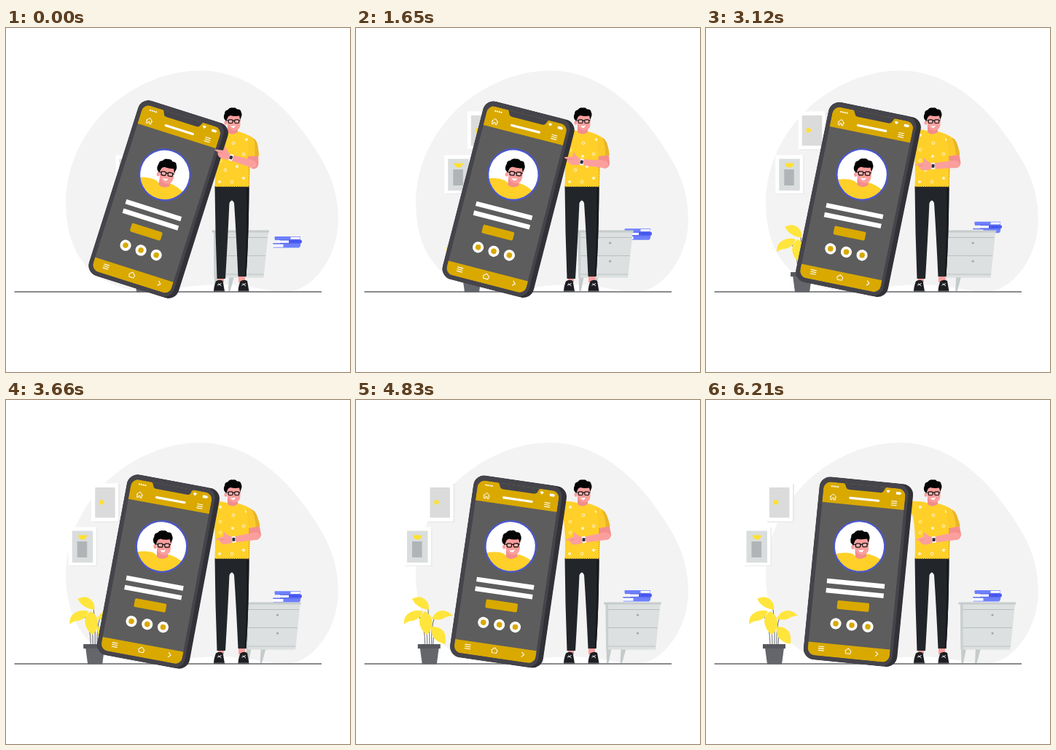
Write an HTML page that moves like this. It is 472 px wide and 472 px high and loops after 6.24 s.

```html
<!DOCTYPE html>
<html lang="en">
<head>
<meta charset="utf-8">
<title>Profile on a phone</title>
<style>
  html, body { margin: 0; width: 100%; height: 100%; overflow: hidden; background: #fff; }
  svg { display: block; width: 100%; height: 100%; }
</style>
</head>
<body>
<svg viewBox="0 0 472 472">
  <defs>
    <clipPath id="screenClip"><rect x="-61.700" y="-119" width="112.700" height="239" rx="10"/></clipPath>
    <clipPath id="avatarClip"><circle r="34"/></clipPath>
    <clipPath id="bodyClip"><rect x="-67.500" y="-126" width="129" height="252" rx="15"/></clipPath>

    <!-- head, centred on its face -->
    <g id="head">
      <path d="M-7 6V15Q-1 20 7 15V6Z" fill="#f28d8b"/>
      <path d="M-8-9H10.500V4Q10 12 3 12.500Q-4 12-7 6Z" fill="#fb9f9d"/>
      <ellipse cx="-9.500" cy="2" rx="2" ry="2.800" fill="#fb9f9d"/>
      <path d="M-11.500-3Q-13-7-11-10.500Q-11-15-7-15.500Q-4-19.500 0-18.500Q4-19.500 6-16.500Q11-17 11.500-13Q13.500-9 11.500-5.500L10.500-2L9-7.500Q2-6.500-3-8Q-7-7-7.500-3L-9-.5Z" fill="#050505"/>
      <g fill="#ffb2ae" stroke="#161214" stroke-width="1.200">
        <rect x="-5.800" y="-2.100" width="5.800" height="4.600" rx="1.200"/>
        <rect x="2.800" y="-2.100" width="5.800" height="4.600" rx="1.200"/>
        <path d="M0-.8H2.800M-9.500-1H-5.800M8.600-1H10.500" fill="none"/>
      </g>
      <path d="M-3 6Q1 7.200 4 5.600Q3 9.200 .5 9Q-2 8.700-3 6Z" fill="#fff"/>
    </g>
    <g id="menu"><path d="M-4-2.700H4M-4 0H4M-4 2.700H4" stroke="#fff" stroke-width="1.100"/></g>
    <path id="home" d="M-4.500.5L0-4L4.500.5M-3.300-.5V4H-1.200V1.500H1.200V4H3.300V-.5" fill="none" stroke="#fff" stroke-width=".9"/>
    <g id="shoe">
      <path d="M-7.500 0Q-7.500-6-4.500-14Q0-17 5-14.500L7.500 0Z" fill="#1d1e22"/>
      <path d="M-7-1H7" stroke="#4b4c52"/>
      <path d="M-2.500-8.500L3-11M-1.500-11L3-7.500" stroke="#fff" stroke-width=".9"/>
    </g>
  </defs>

  <rect width="472" height="472" fill="#fff"/>
  <path d="M82 238C83 190 103 146 140 110C178 76 224 58 268 58.500C330 59 378 102 408 143C436 181 456 214 456 264C455 316 420 361 386 361.500C360 363 340 353 298 352C250 352 220 361 185 361C150 358 118 341 102 316C88 296 82 266 82 238Z" fill="#f3f3f3"/>

  <g id="pictures">
    <path d="M84 115H121V168H84ZM53 175H90V228H53Z" fill="#e9e9e9"/>
    <path d="M82 114.500H119V166.500H82ZM50.500 174.500H88.500V227H50.500Z" fill="#fff"/>
    <rect x="87" y="120" width="27.500" height="41.500" fill="#dbdbdb"/>
    <path d="M93 138Q96 135 100 140Q97 145 93 143Z" fill="#ffe033"/>
    <rect x="55.500" y="179.500" width="28.500" height="43.500" fill="#d9dddd"/>
    <rect x="62.500" y="194" width="13.500" height="22" fill="#b0b4b6"/>
    <path d="M63.500 185.500H76Q75 191.500 70 191.500Q65 191.500 63.500 185.500Z" fill="#ffe033"/>
  </g>

  <path d="M11.500 362H433" stroke="#8a8b8e" stroke-width="2"/>

  <g id="plant">
    <path d="M91 336Q91 326 90 315M94 336Q95 310 92 286M97 336Q96 312 101 298M99 336Q99 325 101 318M88 336Q88 312 80 297" fill="none" stroke="#55575d" stroke-width=".9"/>
    <g fill="#ffe53c">
      <path d="M70 273Q83 266 91 277Q94 282 93 288Q77 286 70 273Z"/>
      <path d="M59 308Q58 296 68 291Q77 287 85 290Q81 301 71 303Q64 303 59 308Z"/>
      <path d="M88 290Q97 294 98 305Q98 316 90 322Q81 315 80 304Q81 294 88 290Z"/>
      <path d="M97 300Q103 288 113 289Q121 290 126 296Q119 296 113 300Q105 303 97 300Z"/>
      <path d="M96 311Q108 310 114 318Q117 324 116 335Q102 332 98 323Z"/>
    </g>
    <path d="M81 340H107L104 362.500H84Z" fill="#64666c"/>
    <path d="M78 335H109V341H78Z" fill="#56585e"/>
  </g>

  <g id="books">
    <path d="M369 261H404V265.500H369Q367.500 263 369 261Z" fill="#6d80ff"/>
    <path d="M390.500 261.800H403.500V264.800H390.500Z" fill="#fff"/>
    <path d="M376 265.800H405Q407 268 405 270.500H376Z" fill="#4a5cf4"/>
    <path d="M375.500 266.500H388V269.800H375.500Z" fill="#fff"/>
    <path d="M367 270.800H404Q405 274 402 276.500H367Q365 273.500 367 270.800Z" fill="#6d80ff"/>
    <path d="M366 271.800H380.500V275.600H366Z" fill="#fff"/>
    <path d="M369 265.600H404M366 270.600H404M392 268H401" stroke="#3446dc" stroke-width=".6"/>
  </g>

  <g id="cabinet">
    <path d="M350 341H357L353 361H350.500ZM370 341H377L371.500 361H369Z" fill="#c5caca"/>
    <path d="M349 280H424L417.500 342.500H349.500Z" fill="#dce0e0"/>
    <path d="M349 280H352.500V342.500H349.500Z" fill="#c9cecf"/>
    <path d="M352.500 287.500H422.500M352.500 312.500H420M352.500 338H417.500" stroke="#b6bcbd" stroke-width=".9"/>
    <path d="M346.500 277.500H425V280.500H346.500Z" fill="#c7cccc"/>
    <g fill="#a0a6a8"><circle cx="393" cy="295" r="1.600"/><circle cx="393" cy="320" r="1.600"/></g>
  </g>

  <g id="man">
    <path d="M319 339H328V349H319ZM291 341H299V349H291Z" fill="#fb9f9d"/>
    <use href="#shoe" x="292.500" y="361.500"/>
    <use href="#shoe" x="326" y="361.500"/>
    <path d="M286.500 217H333.500Q333 290 329.500 341H318.500Q316 285 313 240Q310 233 306.500 240Q304 295 301 344H289.500Q287 280 286.500 217Z" fill="#22262a"/>
    <path d="M330 219H333.500Q333 290 329.500 341H327.500Q331 280 330 219Z" fill="#18191c"/>
    <path d="M276 139Q292 138 303 141Q311 149 319 142Q330 145 337 150L333.500 218H286.500Q288 180 284 160Z" fill="#ffd029"/>
    <path d="M287 217.800H333.500" stroke="#5d4c1c" stroke-dasharray="1.500 1.500"/>
    <path d="M333.500 176V217" stroke="#b98e1c" stroke-dasharray="1.500 1.500"/>
    <g id="spots"></g>
    <use href="#head" transform="translate(311 128)"/>
  </g>

  <g id="phone">
    <g clip-path="url(#bodyClip)">
      <rect x="-68" y="-126" width="130" height="252" fill="#323137"/>
      <rect x="-67.500" y="-126" width="122.500" height="252" rx="15" fill="#45444b"/>
    </g>
    <g clip-path="url(#screenClip)">
      <rect x="-62" y="-119" width="113" height="239" fill="#5d5d5d"/>
      <path d="M-62-119H51V-90.500H-62ZM-62 102H51V120H-62Z" fill="#d9a900"/>
      <path d="M-35-120Q-32-118-31-114Q-30-111-26-111H16Q20-111 21-114Q22-118 25-120Z" fill="#45444b"/>
    </g>
    <g id="dots" fill="#fff"></g>
    <path d="M24.200-114.600Q27-117 29.800-114.600L27-111.400Z" fill="#fff"/>
    <rect x="38" y="-114.400" width="6.500" height="3.600" rx=".8" fill="#fff"/>
    <path d="M45-113.200V-112" stroke="#fff"/>
    <path d="M-24-99.700H15" stroke="#fff" stroke-width="3.200" stroke-linecap="round"/>
    <use href="#home" x="-47.500" y="-99"/>
    <use href="#menu" x="36.500" y="-98.400"/>

    <g transform="translate(-4.900 -34.700)">
      <circle r="34.800" fill="#fff"/>
      <g clip-path="url(#avatarClip)">
        <path d="M-36 15Q-18 8-8 11Q1 18 9 9Q22 9 36 18V36H-36Z" fill="#ffd029"/>
        <use href="#head" transform="translate(1 -2) rotate(-9) scale(1.080)"/>
      </g>
      <circle r="34.800" fill="none" stroke="#4b57c8" stroke-width="2.400"/>
    </g>

    <path d="M-44.600 13.200H34.800V19.700H-44.600ZM-44.600 26.300H34.800V32.800H-44.600Z" fill="#fff"/>
    <rect x="-27.500" y="41.600" width="44" height="12" rx="2" fill="#d9a900"/>
    <g id="badges"></g>
    <use href="#menu" x="-43.500" y="109.800"/>
    <path d="M-10.300 109.500L-6.300 106L-2.300 109.500L-3.300 113.200H-9.300Z" fill="none" stroke="#fff"/>
    <path d="M31.200 106.500L34.700 109.800L31.200 113.100" fill="none" stroke="#fff" stroke-width="1.100"/>
  </g>

  <g id="upperArm">
    <path d="M334 172L347 169L350 184Q350 191 343 192L334 186Z" fill="#f48f8d"/>
    <path d="M329 148Q339 149 343 156Q346 162 348.500 173L333.500 176Z" fill="#fccb29"/>
    <path d="M337 150Q341 152 343 156Q346 162 348.500 173L343 174.200Q342 160 337 150Z" fill="#e8b42a"/>
  </g>
  <g id="forearm">
    <path d="M314 187.500L337 182.500Q347 180 349 186Q349 191 343 192L315 195.500Z" fill="#fb9f9d"/>
    <path d="M311 188.300Q305 187 300 182Q297 181 299 187.500Q292 189.500 288 191.200Q287.500 193 293 192.700Q294.500 198 300 198.500Q306 198.500 311 195.500Z" fill="#fb9f9d"/>
    <path d="M293 192.800L300 191.500" stroke="#e98583" stroke-width=".7"/>
    <path d="M309.800 187.600L314.300 186.800L315.800 195.600L311 196.300Z" fill="#fff"/>
    <rect x="310.600" y="189.200" width="4" height="4.800" rx="1" fill="#2c2f3a"/>
  </g>
</svg>

<script>
  const LOOP = 6240, STEP = 30;
  const el = id => document.getElementById(id);
  const circle = (x, y, r, paint) => `<circle cx="${x}" cy="${y}" r="${r}" ${paint}/>`;

  const solidSpots = [[294, 147], [330, 153], [311, 176], [317, 190], [293, 211], [326, 206]];
  const ringSpots = [[312, 158], [294, 167], [326, 173], [301, 195], [310, 211], [294, 182]];
  el('spots').innerHTML =
    solidSpots.map(([x, y]) => circle(x, y, 2.1, 'fill="#fff3c4"')).join('') +
    ringSpots.map(([x, y]) => circle(x, y, 1.9, 'fill="none" stroke="#fff3c4" stroke-width="1"')).join('');

  el('dots').innerHTML = [0, 1, 2, 3].map(i => circle(-50.5 + 2.8 * i, -113.2, 1.1, '')).join('');
  el('badges').innerHTML = [-26.9, -4.8, 17.3].map(x =>
    circle(x, 73.8, 7.6, 'fill="#fff"') + circle(x, 73.8, 3.8, 'fill="#d9a900"')).join('');

  // Falls linearly from `start` to zero, reached at `end` seconds.
  const settle = (start, end, s) => start * Math.max(0, 1 - s / end);
  const place = (id, transform) => el(id).setAttribute('transform', transform);

  function render(ms) {
    const s = ms / 1000;
    const raise = settle(1, 3.75, s);
    place('pictures', `translate(${settle(100, 5.65, s)} 0)`);
    place('plant', `translate(${settle(95.2, 5.2, s)} 0)`);
    place('cabinet', `translate(${settle(-64, 5.37, s)} 0)`);
    place('books', `translate(0 ${settle(25, 3.85, s)})`);
    place('phone', `translate(212 236) rotate(${17.6 - 1.93 * s})`);
    place('upperArm', `rotate(${10 * raise} 333 165)`);
    place('forearm', `translate(${-2.5 * raise} ${-0.5 * raise}) rotate(${26 * raise} 341 182)`);
  }

  const begin = performance.now();
  function tick() {
    const ms = (performance.now() - begin) % LOOP;
    render(Math.floor(ms / STEP) * STEP);
    requestAnimationFrame(tick);
  }
  tick();
</script>
</body>
</html>
```
